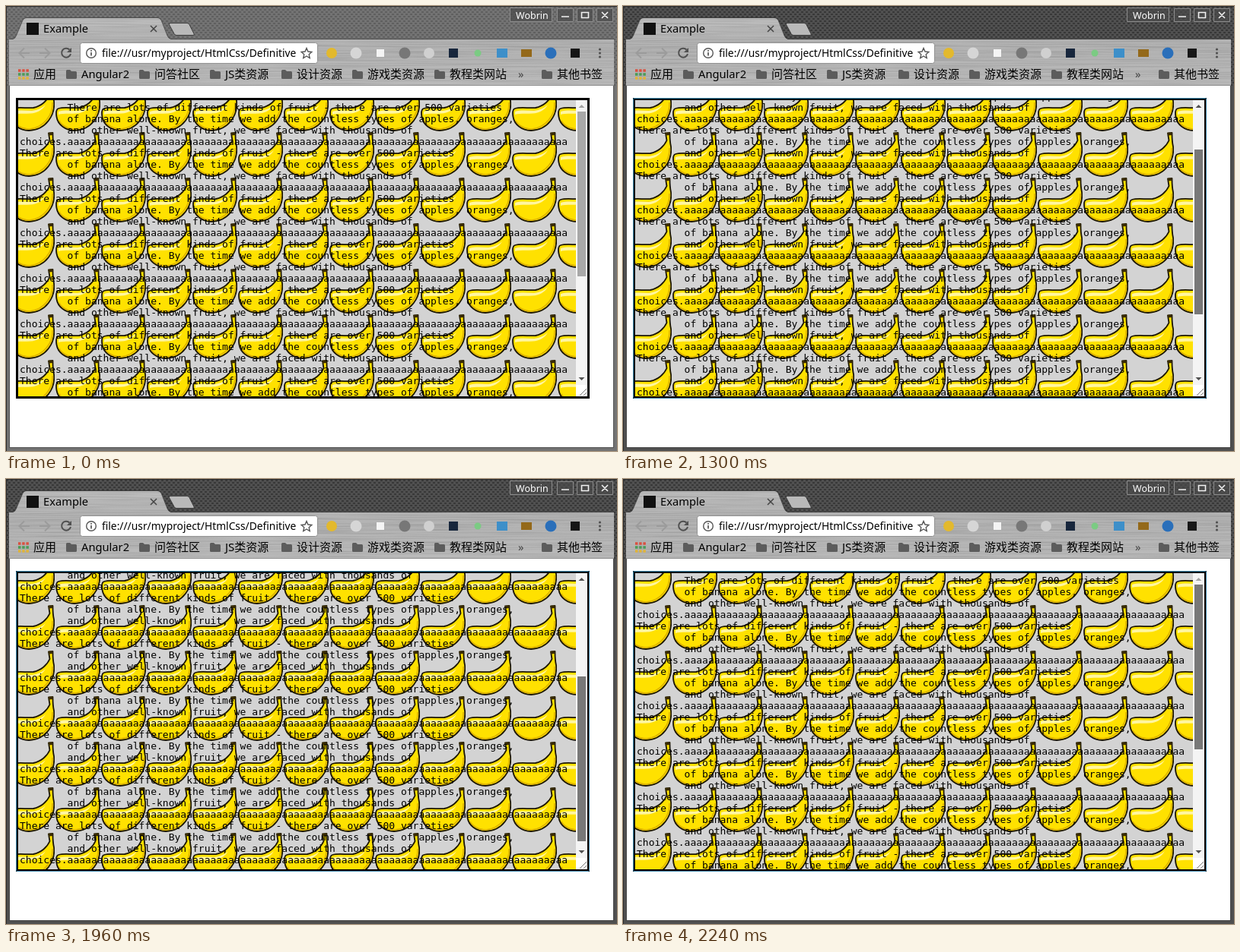
These frames come from a looping animation (803 by 586 pixels, 2870 ms). An HTML page:

```html
<!DOCTYPE html>
<html lang="en">
<head>
<meta charset="utf-8">
<title>Scrolling text area</title>
<style>
@property --scroll { syntax: "<integer>"; inherits: true; initial-value: 0; }

html, body { margin: 0; width: 100%; height: 100%; overflow: hidden; }
body { position: relative; background: #4a4a4a; }
svg { position: absolute; left: 0; top: 0; display: block; }
text { font-family: "Noto Sans", "Noto Sans CJK SC", "Noto Sans CJK", sans-serif; font-size: 14.7px; }
.cjk { font-size: 15px; }

.view { position: absolute; left: 16px; top: 124px; width: 733px; height: 390px; overflow: hidden; }
pre {
  position: absolute; left: 2px; margin: 0; color: #000;
  top: calc(2px - var(--scroll) * 1px);
  font: 13px/15px "DejaVu Sans Mono", monospace;
}
.thumb {
  position: absolute; left: 751px; width: 11px; height: 217px;
  top: calc(139px + var(--scroll) * .559px);
  background: #a8a8a8; animation: press 2870ms step-end infinite;
}
.inactive { animation: hide 2870ms step-end infinite; }
.ring { animation: show 2870ms step-end infinite; }
.up { animation: up 2870ms step-end infinite; }
.down { animation: down 2870ms step-end infinite; }

@keyframes press { 0% { background: #a8a8a8; } 30.65%, 100% { background: #787878; } }
@keyframes hide { 0% { opacity: 1; } 30.65%, 100% { opacity: 0; } }
@keyframes show { 0% { opacity: 0; } 30.65%, 100% { opacity: 1; } }
@keyframes up { 0%, 78.04%, 100% { fill: #a3a3a3; } 36.92% { fill: #505050; } }
@keyframes down { 0%, 68.28%, 100% { fill: #505050; } 54% { fill: #a3a3a3; } }
</style>
</head>
<body>
<svg width="803" height="586" viewBox="0 0 803 586">
  <defs>
    <pattern id="carbon" width="6" height="6" patternUnits="userSpaceOnUse">
      <path fill="#505050" d="M0 0h6v6H0z"/>
      <path fill="#383838" d="M0 1h3v2H0zM3 4h3v2H3z"/>
    </pattern>
    <linearGradient id="metal" x1="0" y1="16" x2="0" y2="104" gradientUnits="userSpaceOnUse">
      <stop offset="0" stop-color="#bdbdbd"/>
      <stop offset=".4" stop-color="#b3b3b3"/>
      <stop offset="1" stop-color="#bababa"/>
    </linearGradient>
    <filter id="brushed" x="0" y="0" width="1" height="1">
      <feTurbulence type="fractalNoise" baseFrequency=".008 .7" numOctaves="2" seed="4"/>
      <feColorMatrix values="0 0 0 0 0  0 0 0 0 0  0 0 0 0 0  0 .6 0 0 -.24"/>
      <feComposite in2="SourceGraphic" operator="in" result="grain"/>
      <feMerge><feMergeNode in="SourceGraphic"/><feMergeNode in="grain"/></feMerge>
    </filter>
    <pattern id="bananas" x="4" y="105" width="60" height="60" patternUnits="userSpaceOnUse">
      <path fill="#ffe100" stroke="#1c1600" stroke-width="1.8" stroke-linejoin="round"
        d="M52 2.500L57.500 2C57.500 9 57.500 14 59 20C61 38 49 58.500 26 59C14 59 4 51 2.500 41C1.500 35 1.500 31 5 30C13 27.500 23 30 32 29C42 27 50 20 53.500 12Z"/>
      <path fill="#fff6a0" d="M5 34C13 31.500 22 33 30 33C37 32 43 30 48 25C44 32 37 36 28 36.500C18 37 10 36 5 38Z"/>
      <path fill="none" stroke="#dcb000" stroke-width="1.500" d="M57 22C58 38 46 55 27 57C17 57 9 52 6 46"/>
      <path fill="#3a2c00" d="M51.500 2l6-.5v3.500l-5 .5z"/>
    </pattern>
    <path id="folder" fill="#5c5c5c" d="M0 1.500Q0 0 1.500 0H5L7 2H12.500Q14 2 14 3.500V10.500Q14 12 12.500 12H1.500Q0 12 0 10.500Z"/>
  </defs>

  <!-- window frame -->
  <path fill="#505050" d="M0 0h803v586H0z"/>
  <path fill="url(#carbon)" d="M0 0h803v105H0z"/>
  <path class="inactive" fill="#fff" fill-opacity=".2" d="M1 1h802v585H1z"/>
  <path fill="none" stroke="#2a2a2a" d="M.5 586V.5H803"/>
  <g fill="#4a4a4a" fill-opacity=".7" stroke="#8c8c8c">
    <path d="M662.500 2.500h55v18h-55zM724.500 3.500h21v17h-21zM750.500 3.500h21v17h-21zM776.500 3.500h21v17h-21z"/>
  </g>
  <text x="670" y="17" fill="#fff" style="font-size:12.500px">Wobrin</text>
  <g fill="none" stroke="#f2f2f2" stroke-width="1.6">
    <path d="M730 14h10M756.500 8.500h9v7h-9zM783 8l8 8m0-8l-8 8"/>
  </g>

  <!-- tab and toolbar -->
  <path fill="url(#metal)" filter="url(#brushed)"
    d="M4 44H9Q12 43 13.500 39L21.500 20Q23 16 27 16H199Q203 16 204.500 20L212 39Q213.500 43 217 44H799V105H4Z"/>
  <path fill="none" stroke="#333" stroke-opacity=".6"
    d="M4 43.500H9Q12 43 13.500 39L21.500 20Q23 15.500 27 15.500H199Q203 15.500 204.500 20L212 39Q213.500 43 217 43.500H799"/>
  <path fill="#b9b9b9" stroke="#3c3c3c" d="M216 22.500H238Q240 22.500 241 24.500L247 36.500Q248 38.500 246 38.500H224Q222 38.500 221 36.500L214.500 24.500Q214 22.500 216 22.500Z"/>
  <path d="M27 22h16v16H27z" fill="#111"/>
  <text x="49" y="35">Example</text>
  <path stroke="#444" stroke-width="1.5" d="M190 26l8 8m0-8l-8 8"/>

  <g fill="none" stroke="#9b9b9b" stroke-width="2">
    <path d="M31 62H18M24 55.500L17.500 62L24 68.500M44 62H57M51 55.500L57.500 62L51 68.500"/>
    <path stroke="#505050" d="M83.500 57.500A6 6 0 1 0 85 63"/>
    <path fill="#505050" stroke="none" d="M86 55v6h-6z"/>
  </g>
  <rect x="97.500" y="48.500" width="312" height="27" rx="3" fill="#fff" stroke="#929292"/>
  <g fill="none" stroke="#555" stroke-width="1.4">
    <circle cx="112" cy="62" r="6.300"/>
    <path stroke-width="1.7" d="M112 61v4.500M112 58v1.700"/>
    <path d="M395 55.500l2 4.500 4.800.5-3.600 3.300 1 4.700-4.200-2.500-4.200 2.500 1-4.700-3.600-3.300 4.800-.5z"/>
  </g>
  <text x="126" y="67" style="font-size:13.800px">file:///usr/myproject/HtmlCss/Definitive</text>

  <!-- extension buttons -->
  <circle cx="428" cy="62" r="7" fill="#e3b92d"/>
  <circle cx="460" cy="62" r="7.500" fill="#d6d6d6"/>
  <path d="M487 57h10v10h-10z" fill="#f4f4f4"/>
  <circle cx="524" cy="62" r="7.500" fill="#777"/>
  <circle cx="556" cy="62" r="7" fill="#d0d0d0"/>
  <path d="M582 56h12v12h-12z" fill="#17263c"/>
  <circle cx="620" cy="62" r="4.500" fill="#7bcb83"/>
  <path d="M645 56h14v12h-14z" fill="#3d8fc9"/>
  <path d="M677 57h14v10h-14z" fill="#94691a"/>
  <circle cx="716" cy="62" r="7.500" fill="#2a6fba"/>
  <path d="M742 56h12v12h-12z" fill="#161616"/>
  <g fill="#505050"><circle cx="780.500" cy="57" r="1.600"/><circle cx="780.500" cy="62" r="1.600"/><circle cx="780.500" cy="67" r="1.600"/></g>

  <!-- bookmarks -->
  <g stroke-width="3.500" stroke-dasharray="3.500 1.700">
    <path stroke="#d9503f" d="M16 85h14"/>
    <path stroke="#4b9b55" d="M16 90h14"/>
    <path stroke="#e0b43a" d="M16 95h14"/>
  </g>
  <text class="cjk" x="36" y="95">应用</text>
  <g id="bookmarks"></g>
  <text x="673" y="95" fill="#444">»</text>
  <path stroke="#8f8f8f" d="M4 104.500h795"/>

  <!-- page -->
  <path fill="#fff" d="M5 105h793v476H5z"/>
  <path fill="none" stroke="#3a3a3a" stroke-opacity=".6" d="M4.500 105v476.500h794V105"/>
  <path d="M13 121h754v396H13z"/>
  <rect class="ring" x="13.500" y="121.500" width="753" height="395" rx="1" fill="none" stroke="#3a86ad"/>
  <path fill="#d3d3d3" d="M16 124h733v390H16z"/>
  <path fill="url(#bananas)" d="M16 124h733v390H16z"/>
  <path fill="#f4f4f4" d="M749 124h15v375h-15z"/>
  <path fill="#fff" d="M749 499h15v15h-15z"/>
  <path stroke="#777" d="M754 513l9-9M759 513l4-4"/>
  <path class="up" d="M752.500 134l4-4 4 4z"/>
  <path class="down" d="M752.500 489l4 4 4-4z"/>
</svg>
<div class="view"><pre id="copy"></pre></div>
<div class="thumb"></div>

<script>
const bookmarks = [
  [79, "Angular2"], [175, "问答社区"], [268, "JS类资源"], [362, "设计资源"],
  [455, "游戏类资源"], [563, "教程类网站"], [704, "其他书签"]
];
document.getElementById("bookmarks").innerHTML = bookmarks.map(([x, label]) =>
  `<use href="#folder" x="${x}" y="84"/>
   <text x="${x + 20}" y="95"${/^A/.test(label) ? "" : ' class="cjk"'}>${label}</text>`
).join("");

const indent = " ".repeat(8);
const verse = [
  "There are lots of different kinds of fruit - there are over 500 varieties",
  indent + "of banana alone. By the time we add the countless types of apples, oranges,",
  indent + "and other well-known fruit, we are faced with thousands of",
  "choices." + "a".repeat(84),
  ""
].join("\n");
document.getElementById("copy").textContent = indent + verse.repeat(10);

// The thumb is dragged by hand: eased travel, repainted every 40 ms.
const duration = 2870, scrollMax = 229, repaint = 40;

const pose = (time, scroll) => ({
  offset: time / duration, "--scroll": String(Math.floor(scroll)), easing: "step-end"
});

function drag(start, end, steps, travel) {
  return Array.from({ length: steps }, (_, i) => {
    const n = i + 1;
    const time = n === steps ? end : start + n * repaint;
    return pose(time - 1, scrollMax * travel(n / steps));
  });
}

document.body.animate([
  pose(0, 0),
  ...drag(1020, 1550, 13, x => x ** 1.5),
  ...drag(1920, 2240, 8, x => 1 - Math.sin(x * Math.PI / 2) ** 1.85),
  pose(duration, 0)
], { duration, iterations: Infinity });
</script>
</body>
</html>
```
